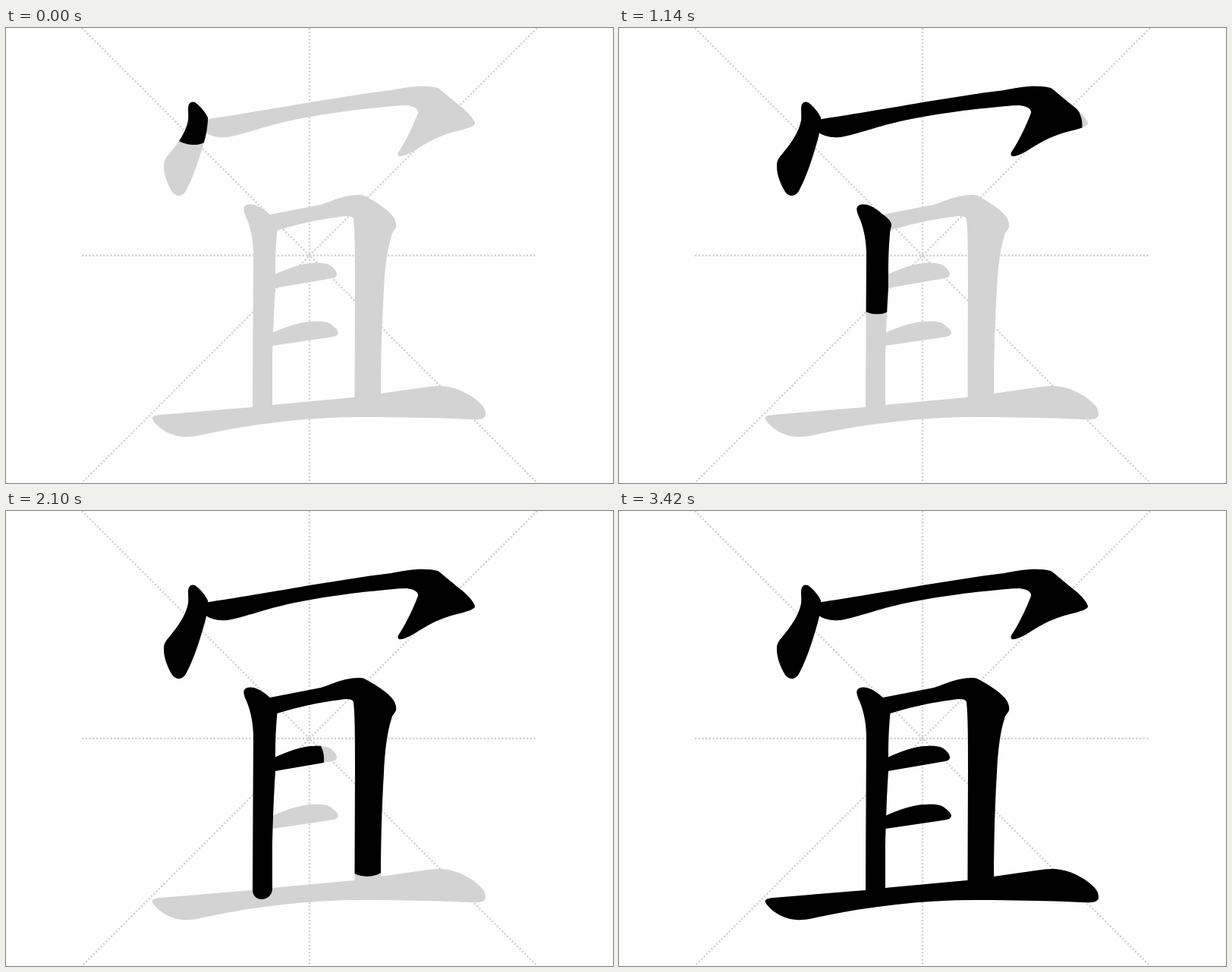
Recreate the animation shown at these times as an HTML page. Size 800 px wide and 600 px high, loop 3480 ms.

```html
<!DOCTYPE html>
<html lang="en">
<head>
<meta charset="utf-8">
<title>Stroke order</title>
<style>
  html, body { margin: 0; width: 100%; height: 100%; overflow: hidden; background: #fefefe; }
  svg { display: block; width: 800px; height: 600px; }
  .grid { stroke: #d3d3d3; stroke-width: 1; stroke-dasharray: 1 1; }
  .base { fill: #d3d3d3; }
  .brush { fill: none; stroke: #000; stroke-width: 75; stroke-linecap: round; stroke-linejoin: round; }
</style>
</head>
<body>
<svg viewBox="0 0 800 600">
  <path class="grid" transform="translate(100) scale(2.34375)" d="M0 0L256 256M256 0L0 256M128 0V256M0 128H256"/>
  <g id="base" class="base"></g>
  <g id="ink"></g>
</svg>
<script>
const LOOP = 3480, STEP = 60;

// shape: outline, line: brush path, from/to: brush travel in ms, full: time the outline is filled
const strokes = [
  {
    shape: "M241 101C243 97 246 97 249 98C256 103 262 110 266 118L266 123C265 133 264 140 262 147C257 165 248 195 237 215C232 223 224 223 219 216C213 206 208 194 208 182C208 174 211 171 216 165C226 153 237 138 240 122C241 113 239 106 241 101Z",
    line: "M245 106L247 116L240 150L226 195", from: -40, to: 300, full: 380
  },
  {
    shape: "M264 120.5C300 115 350 107 400 98L480 85.5L508 82C525 78 552 74 569 79C574 82 580 88 600 104C611 113 618 122 618 126C618 129 609 132 602 134C580 139 565 145 549 155C536 163 528 168 521 169C516 170 515 166 519 161C528 147 538 126 543 112C544 106 536 103 528 102C515 102 502 104 490 105C465 107 420 113 385 120C345 128 320 138 297 143C283 146 270 143 262 137Z",
    line: "M258 128L400 107L500 92L545 90L573 128L522 165", from: 376, to: 973, full: 1740
  },
  {
    shape: "M314 236C316 232 322 232 327 233C336 236 342 241 348 246C354 250 360 256 359 261C358 265 357 268 357 272C355 295 355 310 355 342C353 375 352 400 351 440L351 499C350 508 343 512 337 512C330 512 325 507 325 500L326 297C326 282 323 266 318 253C315 246 312 240 314 236Z",
    line: "M325 245L340 280L340 340L337 480", from: 994, to: 1349, full: 1380
  },
  {
    shape: "M348 246L415 233C425 230 435 225 448 222C458 220 467 219 472 221C485 228 500 237 508 246C513 252 515 258 514 263C512 267 509 269 508 274C502 292 499 320 498 345C495 395 494 440 494 484C494 494 484 498 474 498C465 498 459.5 495 459.5 488L460 340C460 300 460 270 458 252C457 248 450 247 440 249C415 252 385 258 357 267L350 268Z",
    line: "M340 262L420 242L461 236L481 252L478 300L476 444.5", from: 1375, to: 1885, full: 2340
  },
  {
    shape: "M354 325C372 317 390 310 405 310C420 309 426 311 431 316C435 320 436 323 436 325C436 329 431 330 424 331L354 343Z",
    line: "M345 333L410 322", from: 1920, to: 2240, full: 2250
  },
  {
    shape: "M351 402C369 394 388 387 405 387C420 386 426 388 431 393C436 397 438 400 438 402C437 406 433 407 426 408L351 419Z",
    line: "M345 410L410 399", from: 2250, to: 2560, full: 2570
  },
  {
    shape: "M193 516C192 512 195 511 204 510L325 500L351 497L459 487L494 482L550 474C563 472 573 471 582 473C600 476 618 487 627 497C632 503 632 507 632 511C630 516 622 517 610 516C570 514 520 513 470 513C400 513 330 521 260 536C243 540 232 540 222 537C209 533 197 524 193 516Z",
    line: "M203 522L300 511L408.5 502L579 497", from: 2569, to: 3134, full: 3300
  }
];

function add(parent, tag, attrs) {
  const el = document.createElementNS("http://www.w3.org/2000/svg", tag);
  for (const key in attrs) el.setAttribute(key, attrs[key]);
  return parent.appendChild(el);
}

const base = document.getElementById("base");
const ink = document.getElementById("ink");

strokes.forEach((s, i) => {
  add(base, "path", { d: s.shape });
  const clip = add(ink, "clipPath", { id: "clip" + i });
  add(clip, "path", { d: s.shape });
  s.brush = add(ink, "path", { d: s.line, class: "brush", "clip-path": `url(#clip${i})` });
  s.solid = add(ink, "path", { d: s.shape });
  s.length = s.brush.getTotalLength();
});

function show(el, on) {
  el.style.visibility = on ? "visible" : "hidden";
}

function draw(time) {
  for (const s of strokes) {
    const done = Math.min(1, (time - s.from) / (s.to - s.from));
    const full = time >= s.full;
    show(s.solid, full);
    show(s.brush, done > 0 && !full);
    if (done > 0) s.brush.style.strokeDasharray = `${done * s.length} 2000`;
  }
}

const start = performance.now();
function tick() {
  const time = (performance.now() - start) % LOOP;
  draw(Math.floor(time / STEP) * STEP);
  requestAnimationFrame(tick);
}
tick();
</script>
</body>
</html>
```
